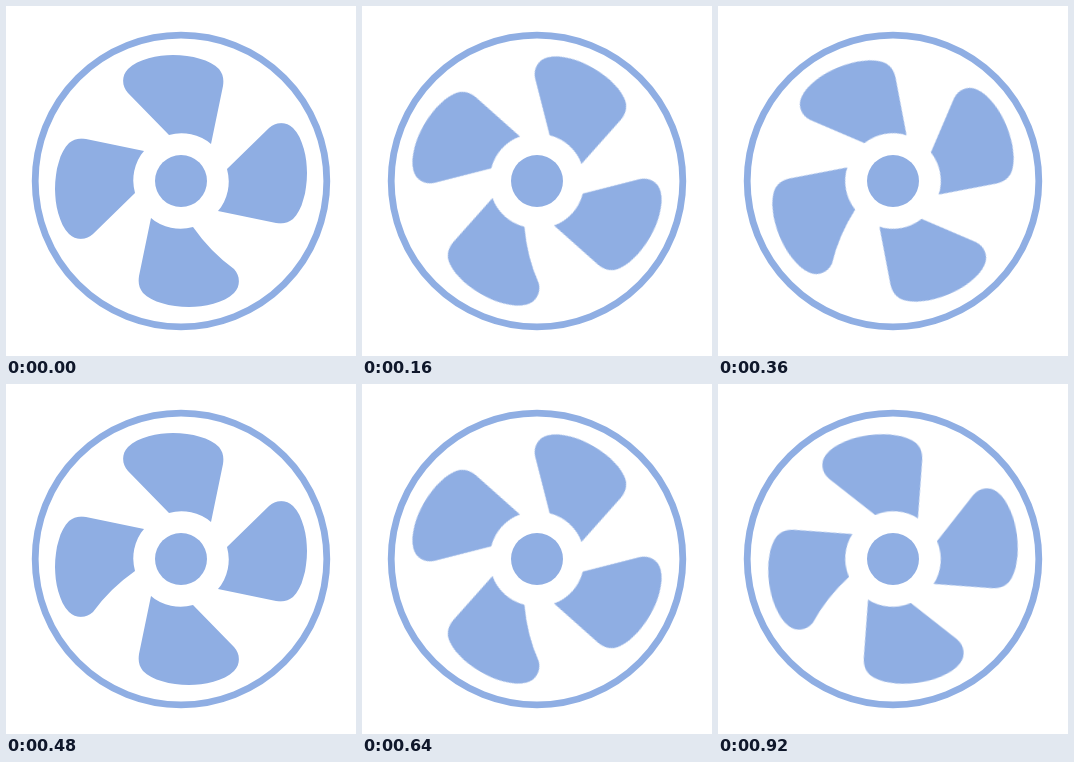
These frames come from a looping animation (350 by 350 pixels, 0.96 s). An HTML page without scripts:

```html
<!DOCTYPE html>
<html lang="en">
<head>
<meta charset="utf-8">
<title>Spinning fan</title>
<style>
  html, body { margin: 0; width: 100%; height: 100%; overflow: hidden; background: #fff; }
  svg { display: block; width: 100%; height: 100%; }
  .fan { fill: #8faee3; }
  .ring { fill: none; stroke: #8faee3; stroke-width: 6.8; }
  .blades { animation: spin 960ms -2ms infinite; }

  /* Two quarter turns; the first one rests on its end pose for one step. */
  @keyframes spin {
    0% { transform: rotate(0deg); animation-timing-function: steps(12, end); }
    50% { transform: rotate(90deg); animation-timing-function: steps(1, end); }
    54.16667% { transform: rotate(7.5deg); animation-timing-function: steps(11, end); }
    100% { transform: rotate(90deg); }
  }
</style>
</head>
<body>
<svg viewBox="-175 -175 350 350">
  <defs>
    <path id="blade" d="M-12 -46 L-53 -88 C-59 -94 -60 -105 -53 -112 C-43 -122 -23 -126 -8 -126
      C11 -126 29 -121 38 -112 C42 -107 43 -102 42 -95 L30 -37 A46.5 46.5 0 0 0 -12 -46Z"/>
    <path id="bowed-blade" d="M-12 -46 Q-29.5 -71 -53 -88 C-59 -94 -60 -105 -53 -112 C-43 -122 -23 -126 -8 -126
      C11 -126 29 -121 38 -112 C42 -107 43 -102 42 -95 L30 -37 A46.5 46.5 0 0 0 -12 -46Z"/>
  </defs>
  <circle class="ring" r="145.8"/>
  <g class="fan">
    <g class="blades">
      <use href="#blade"/>
      <use href="#blade" transform="rotate(90)"/>
      <use href="#bowed-blade" transform="rotate(180)"/>
      <use href="#blade" transform="rotate(270)"/>
    </g>
    <circle r="26"/>
  </g>
</svg>
</body>
</html>
```
